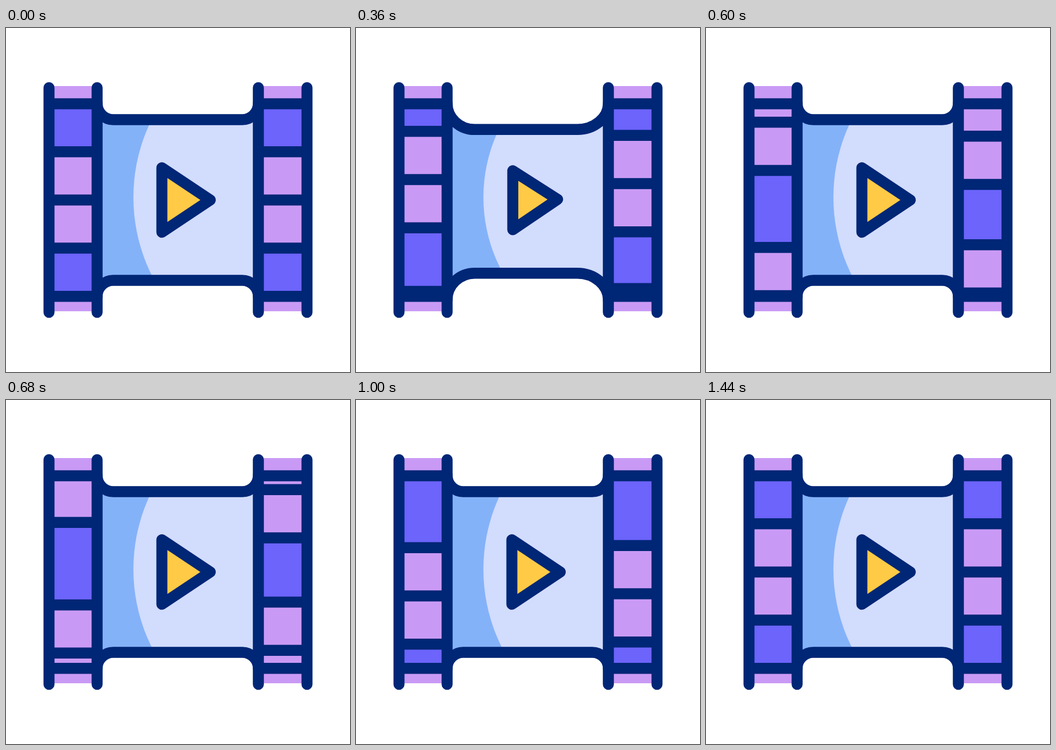
An HTML page for the animation above (1.48 s loop, 640x640 px).

```html
<!DOCTYPE html>
<html lang="en">
<head>
<meta charset="utf-8">
<title>Film strip</title>
<style>
  html, body { margin: 0; width: 100%; height: 100%; overflow: hidden; background: #fff; }
  svg { display: block; width: 100%; height: 100%; }
  .line, .bar { fill: none; stroke: #002676; stroke-width: 20.5; }
  .line { stroke-linecap: round; stroke-linejoin: round; }
  .lilac { fill: #c99af5; }
  .violet { fill: #6c64fb; }
</style>
</head>
<body>
<svg viewBox="0 0 640 640">
  <defs>
    <clipPath id="screenClip"><path id="screenMask"/></clipPath>
    <clipPath id="stripClip"><rect x="60" y="131" width="520" height="378"/></clipPath>
  </defs>
  <g id="film">
    <path id="screen" fill="#84b2f8"/>
    <g clip-path="url(#screenClip)"><ellipse id="glow" cx="562" cy="315" rx="325" fill="#d2dcfd"/></g>
    <path id="edges" class="line"/>
    <rect class="lilac" x="80" y="108" width="89.5" height="419"/>
    <rect class="lilac" x="469.5" y="108" width="90" height="419"/>
    <g id="strips" clip-path="url(#stripClip)"></g>
    <path class="bar" d="M80 141H169.5M80 499.2H169.5M469.5 141H560M469.5 499.2H560"/>
    <path class="line" d="M80 111V529M169.5 111V529M469.5 111V529M560 111V529"/>
    <path id="play" class="line" style="fill:#ffca45"/>
  </g>
</svg>
<script>
const LOOP = 1480;
const FIRST = 230.2, GAP = 89.7, LAST = FIRST + 2 * GAP;
const $ = id => document.getElementById(id);

// Smooth step from 0 to 1 between times a and b.
function ease(t, a, b) {
  const u = Math.min(1, Math.max(0, (t - a) / (b - a)));
  return u * u * (3 - 2 * u);
}

// Time travelled when speed grows evenly from 0 to 1 between a and b.
function ramp(t, a, b) {
  if (t <= a) return 0;
  return t < b ? (t - a) ** 2 / (2 * (b - a)) : t - (a + b) / 2;
}

const bob = t => 20 * ease(t, 0, 130) - 26.3 * ease(t, 130, 295) + 6.3 * ease(t, 295, 360);
const pinch = t => ease(t, 80, 370) - ease(t, 370, 580);
const press = t => ease(t, 0, 200) - ease(t, 200, 460);

// Three bars speed up and leave at the top, three more slow down to rest.
const sides = [
  { x: 80, w: 89.5, speed: 0.465, from: 140, full: 440, rest: 1325, lead: 0 },
  { x: 469.5, w: 90.5, speed: 0.43, from: 120, full: 530, rest: 1310, lead: 17 }
];

function add(tag, cls) {
  const el = document.createElementNS("http://www.w3.org/2000/svg", tag);
  el.setAttribute("class", cls);
  return $("strips").appendChild(el);
}
for (const s of sides) {
  s.cells = add("path", "violet");
  s.bars = add("path", "bar");
}

function drawStrip(s, t) {
  const out = -s.speed * ramp(t, s.from, s.full);
  const enter = 0.34 * ramp(s.rest - t, 0, 400);
  const lead = s.lead * ease(t, 600, 800);
  const cell = (a, b) => b > a ? `M${s.x} ${a}h${s.w}V${b}h${-s.w}z` : "";
  s.cells.setAttribute("d",
    cell(131, FIRST + out) + cell(LAST + out - lead, FIRST + enter) + cell(LAST + enter, 520));
  let d = "";
  for (const shift of [out, enter])
    for (let i = 0; i < 3; i++) d += `M${s.x} ${FIRST + i * GAP + shift}h${s.w}`;
  s.bars.setAttribute("d", d);
}

function drawScreen(p) {
  const l = 30 + 21.5 * p, r = 30 + 28 * p;
  const up = 30 + 18.4 * p, low = 30 + 19.4 * p, foot = 499.5 + 6 * p;
  const top = `169.5 140.5A${l} ${up} 0 0 0 ${169.5 + l} ${140.5 + up}H${469.5 - r}A${r} ${up} 0 0 0 469.5 140.5`;
  const bottom = `469.5 ${foot}A${r} ${low} 0 0 0 ${469.5 - r} ${foot - low}H${169.5 + l}A${l} ${low} 0 0 0 169.5 ${foot}`;
  $("edges").setAttribute("d", `M${top}M${bottom}`);
  for (const id of ["screen", "screenMask"]) $(id).setAttribute("d", `M${top}L${bottom}z`);
  $("glow").setAttribute("ry", 325 - 18 * p);
}

function drawPlay(q) {
  $("play").setAttribute("d",
    `M${290 + 5.2 * q} ${260 + 17.3 * q}V${380 - 14.9 * q}L${380 - 15.3 * q} ${320 - 3.7 * q}z`);
}

function draw(t) {
  $("film").setAttribute("transform", `translate(0 ${bob(t)})`);
  drawScreen(pinch(t));
  for (const s of sides) drawStrip(s, t);
  drawPlay(press(t));
}

const start = performance.now();
function tick() {
  draw((performance.now() - start) % LOOP);
  requestAnimationFrame(tick);
}
draw(0);
requestAnimationFrame(tick);
</script>
</body>
</html>
```
